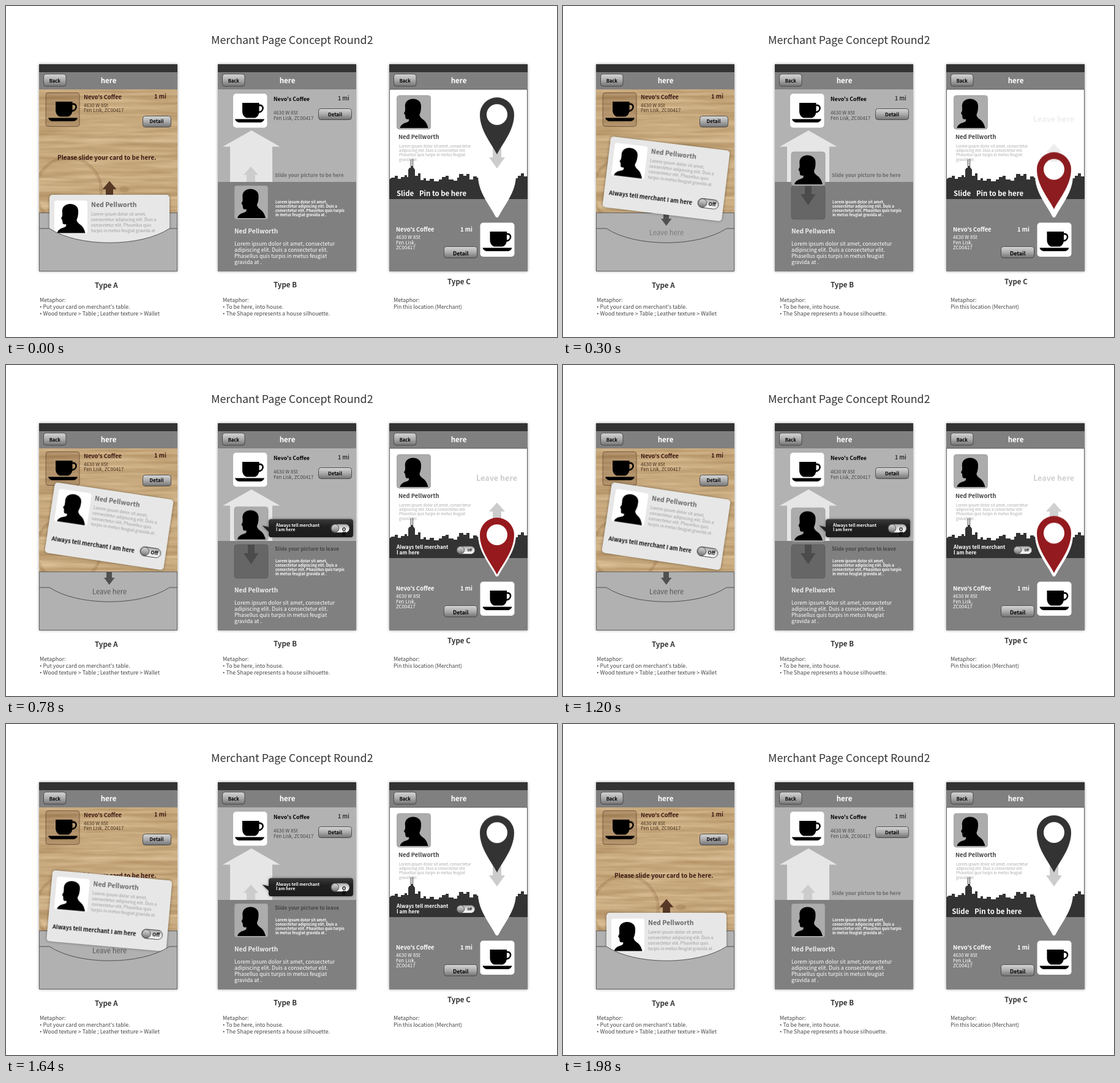
An HTML page for the animation above (2 s loop, 900 by 540 pixels).

```html
<!DOCTYPE html>
<html lang="en">
<head>
<meta charset="utf-8">
<title>Merchant Page Concept</title>
<style>
html, body { margin: 0; width: 100%; height: 100%; overflow: hidden; background: #fff; }
svg { display: block; width: 900px; height: 540px; }
text { font-family: "Noto Sans CJK JP", "Noto Sans CJK SC", "Noto Sans CJK KR", "Noto Sans CJK TC", "Noto Sans", sans-serif; }
.b { font-weight: 700; }
.mid { text-anchor: middle; }
.dot { font-family: "Open Sans", sans-serif; }
.shadow { filter: drop-shadow(0 0 2px rgba(0, 0, 0, .4)); }
.btn { fill: url(#metal); stroke: #444; stroke-width: .9; }

.card, .tile, .pin, .show, .hide, .slideOut, .slideIn, .leave, .down, .pocketHint {
  animation: 2s linear infinite;
  --out: cubic-bezier(.333, .667, .667, 1);
}
.card { animation-name: card; }
.tile { animation-name: tile; }
.pin { animation-name: pin; }
.show { animation-name: show; }
.hide { animation-name: hide; }
.slideOut { animation-name: slideOut; }
.slideIn { animation-name: slideIn; }
.leave { animation-name: leave; }
.down { animation-name: down; }
.pocketHint { animation-name: pocketHint; }

@keyframes card {
  0% { transform: translate(169px, 366px) rotate(0deg); animation-timing-function: var(--out); }
  29.3%, 76.2% { transform: translate(168.5px, 263px) rotate(8.5deg); animation-timing-function: var(--out); }
  99.7%, 100% { transform: translate(169px, 366px) rotate(0deg); }
}
@keyframes tile {
  0% { transform: translateY(0); animation-timing-function: var(--out); }
  24.5%, 59% { transform: translateY(-61.5px); animation-timing-function: var(--out); }
  83.5%, 100% { transform: translateY(0); }
}
@keyframes pin {
  0% { transform: translate(802px, 177px); fill: #333; animation-timing-function: var(--out); }
  24.5%, 59% { transform: translate(802px, 277px); fill: #96191d; animation-timing-function: var(--out); }
  83.5%, 100% { transform: translate(802px, 177px); fill: #333; }
}
@keyframes show {
  0%, 27% { opacity: 0; }
  39%, 86% { opacity: 1; }
  98.5%, 100% { opacity: 0; }
}
@keyframes hide {
  0%, 27% { opacity: 1; }
  39%, 86% { opacity: 0; }
  98.5%, 100% { opacity: 1; }
}
@keyframes slideOut {
  0%, 27% { transform: translateX(0); }
  39%, 86% { transform: translateX(-42px); }
  100% { transform: translateX(0); }
}
@keyframes slideIn {
  0%, 27% { transform: translateX(40px); }
  39%, 86% { transform: translateX(0); }
  100% { transform: translateX(40px); }
}
@keyframes leave {
  0%, 9% { opacity: 0; }
  27%, 59% { opacity: 1; animation-timing-function: var(--out); }
  70%, 100% { opacity: 0; }
}
@keyframes down {
  0% { opacity: 1; }
  8%, 66% { opacity: 0; }
  80%, 100% { opacity: 1; }
}
@keyframes pocketHint {
  0%, 8% { opacity: 0; }
  20%, 84% { opacity: 1; }
  90%, 100% { opacity: 0; }
}
</style>
</head>
<body>
<svg viewBox="0 0 900 540">
<defs>
  <linearGradient id="metal" x2="0" y2="1">
    <stop stop-color="#d6d6d6"/><stop offset=".5" stop-color="#ababab"/><stop offset="1" stop-color="#727272"/>
  </linearGradient>
  <linearGradient id="pill" x2="0" y2="1">
    <stop stop-color="#a8a8a8"/><stop offset=".5" stop-color="#dedede"/><stop offset="1" stop-color="#fff"/>
  </linearGradient>
  <linearGradient id="bubble" x2="0" y2="1">
    <stop stop-color="#3a3a3a"/><stop offset=".4" stop-color="#202020"/><stop offset="1" stop-color="#1c1c1c"/>
  </linearGradient>
  <filter id="wood" x="0" y="0" width="1" height="1" color-interpolation-filters="sRGB">
    <feTurbulence type="fractalNoise" baseFrequency=".009 .13" numOctaves="3" seed="8"/>
    <feColorMatrix values=".22 0 0 0 .67  .24 0 0 0 .54  .26 0 0 0 .36  0 0 0 0 1"/>
  </filter>
  <clipPath id="woodBox"><rect x="54" y="136" width="226" height="201"/></clipPath>
  <clipPath id="pocketBox"><path d="M40 130H300V363H267C220 394 118 394 71 363H40Z"/></clipPath>
  <clipPath id="screenC"><rect x="626" y="136" width="226" height="297"/></clipPath>

  <g id="frame">
    <rect class="shadow" width="226" height="338" fill="#808080"/>
    <rect width="226" height="13" fill="#333"/>
    <rect class="btn" x="7.5" y="16" width="36.500" height="20" rx="4"/>
    <text class="b" x="16.700" y="30" font-size="7.500">Back</text>
    <text class="b" x="100.700" y="30.800" font-size="11.600" fill="#fff">here</text>
  </g>
  <g id="cup">
    <path d="M16 14.500H43.500V28C43.500 34 40.500 37.500 37 39H22.500C19 37.500 16 34 16 28Z"/>
    <path d="M43 18.500C52 17 52 29 42 30" fill="none" stroke="#000" stroke-width="2.600"/>
    <path d="M4 41H52C51 44.500 48 46.500 44 46.500H12C8 46.500 5 44.500 4 41Z"/>
  </g>
  <path id="man" d="M5 53C6 48 11 45 17 43.500C20 42.500 20 40 19.500 38.500C16 39 14 38.500 14 36L13.500 32L11.500 29L13.500 25V20C12 11 18 6 25 5.500C35 5 40 11 39.500 18C39.500 24 38.500 28 37 31C37 35 40 37 43 39.500C47 42 50 48 51 53Z"/>
  <g id="greyMan">
    <rect width="55" height="55" rx="4" fill="#acacac" stroke="#999" stroke-width=".8"/>
    <use href="#man"/>
  </g>
  <g id="toggle">
    <rect x="-17" y="-7.500" width="34" height="15" rx="7.500" fill="url(#pill)" stroke="#444"/>
    <circle cx="-9.500" r="7" fill="url(#metal)" stroke="#444" stroke-width=".9"/>
  </g>
  <path id="pinShape" d="M0 65C-9 47 -28 26 -28 0A28 28 0 1 1 28 0C28 26 9 47 0 65Z"/>
</defs>

<rect width="900" height="540" fill="#fff"/>
<text x="335" y="62" font-size="17.850" fill="#333">Merchant Page Concept Round2</text>

<!-- Type A -->
<use href="#frame" x="54" y="95"/>
<rect x="54" y="136" width="226" height="201" filter="url(#wood)"/>
<g clip-path="url(#woodBox)" fill="none" stroke="#6b3f1c">
  <circle cx="102" cy="301" r="53" stroke-width="5" opacity=".14"/>
  <circle cx="102" cy="301" r="55" stroke-width="1" opacity=".22"/>
  <ellipse cx="193" cy="299" rx="8" ry="5" fill="#6b3f1c" stroke="none" opacity=".15"/>
</g>
<rect x="65" y="141.500" width="55" height="55" rx="4" fill="#6b4a2c" fill-opacity=".25" stroke="#5c4028" stroke-opacity=".7"/>
<use href="#cup" x="65" y="141.500"/>
<g fill="#3c1a15">
  <text class="b" x="127" y="152" font-size="9.300">Nevo's Coffee</text>
  <text class="b" x="242" y="151" font-size="9.500">1 mi</text>
  <g font-size="7.900" fill="#43301f">
    <text x="127" y="165.200">4630 W 8St</text>
    <text x="127" y="173.400">Fen Lisk, ZC00417</text>
  </g>
  <text class="b" x="84" y="250.500" font-size="10">Please slide your card to be here.</text>
  <path d="M169 285.500L180.500 299H175V310H163V299H157.500Z" fill="#47291a" opacity=".88"/>
</g>
<rect class="btn" x="223.500" y="179.500" width="46" height="18" rx="4"/>
<text class="b mid" x="246" y="191.200" font-size="8">Detail</text>
<rect x="54.500" y="337.500" width="225" height="95" fill="#b1b1b1" stroke="#555" stroke-width=".8"/>
<path d="M164 337.500H173V347H177.500L168.700 358.500L160 347H164Z" fill="#505050"/>
<text class="pocketHint" x="141" y="374.300" font-size="11.200" fill="#555">Leave here</text>
<g clip-path="url(#pocketBox)">
  <g class="card">
    <g transform="translate(-98 -58)">
      <rect class="shadow" width="196" height="116" rx="5" fill="#e7e7e7"/>
      <rect x="8" y="9.500" width="54" height="54" rx="4" fill="#fff"/>
      <use href="#man" x="7.500" y="9.500"/>
      <text class="b" x="68" y="20" font-size="10.600" fill="#666">Ned Pellworth</text>
      <g font-size="6.850" fill="#999">
        <text x="68" y="34">Lorem ipsum dolor sit amet,</text>
        <text x="68" y="43.200">consectetur adipiscing elit. Duis a</text>
        <text x="68" y="52.200">consectetur elit. Phasellus quis</text>
        <text x="68" y="61.200">turpis in metus feugiat gravida at .</text>
      </g>
      <text class="b" x="8" y="94.500" font-size="9.050" fill="#111">Always tell merchant I am here</text>
      <use href="#toggle" x="171" y="90"/>
      <text class="b" x="171.500" y="93.200" font-size="8">Off</text>
    </g>
  </g>
</g>
<path d="M54.500 363H71C118 394 220 394 267 363H279.500" fill="none" stroke="#444" stroke-width=".9"/>

<!-- Type B -->
<use href="#frame" x="346" y="95"/>
<rect x="346" y="136" width="226" height="151" fill="#b2b2b2"/>
<rect x="371" y="143" width="55.500" height="55.500" rx="5" fill="#fff"/>
<use href="#cup" x="370" y="143.500"/>
<text class="b" x="437" y="154.500" font-size="8.850">Nevo's Coffee</text>
<text class="b" x="542" y="153.500" font-size="9" fill="#333">1 mi</text>
<g font-size="7.900" fill="#444">
  <text x="437" y="177">4630 W 8St</text>
  <text x="437" y="185.500">Fen Lisk, ZC00417</text>
</g>
<rect class="btn" x="510.500" y="167.500" width="54" height="18" rx="4"/>
<text class="b mid" x="537.500" y="179.700" font-size="8">Detail</text>
<path d="M401 203L447.500 229.500H435V287H366V229.500H354Z" fill="#e6e6e6"/>
<path d="M400 262L412 275.500H407V287H393V275.500H388Z" fill="#ccc"/>
<rect x="373" y="293" width="55" height="55" rx="4" fill="#666" stroke="#5c5c5c" stroke-width=".8"/>
<path d="M395 293H406V307H412.500L400.500 325L388 307H395Z" fill="#4b4b4b"/>
<text class="b hide" x="439" y="279.300" font-size="8.140" fill="#6a6a6a">Slide your picture to be here</text>
<text class="b show" x="439" y="303.300" font-size="8.200" fill="#444">Slide your picture to leave</text>
<g fill="#fff">
  <g class="b" font-size="6.130">
    <text x="440" y="322">Lorem ipsum dolor sit amet,</text>
    <text x="440" y="329">consectetur adipiscing elit. Duis a</text>
    <text x="440" y="336">consectetur elit. Phasellus quis turpis</text>
    <text x="440" y="343">in metus feugiat gravida at .</text>
  </g>
  <text class="b" x="373" y="370.800" font-size="10.150" fill="#eee">Ned Pellworth</text>
  <g font-size="8.720">
    <text x="373" y="391">Lorem ipsum dolor sit amet, consectetur</text>
    <text x="373" y="401">adipiscing elit. Duis a consectetur elit.</text>
    <text x="373" y="411">Phasellus quis turpis in metus feugiat</text>
    <text x="373" y="421">gravida at .</text>
  </g>
</g>
<g class="tile"><use href="#greyMan" x="373" y="293"/></g>
<g class="show">
  <path class="shadow" d="M433 251.500H563Q567 251.500 567 255.500V277Q567 281 563 281H433Q429 281 429 277V272L418.500 262L429 264.500V255.500Q429 251.500 433 251.500Z" fill="url(#bubble)"/>
  <g class="b" font-size="6.900" fill="#fff">
    <text x="441" y="264">Always tell merchant</text>
    <text x="441" y="271.300">I am here</text>
  </g>
  <use href="#toggle" transform="translate(546 266.500) scale(.89 .93)"/>
  <g class="b" font-size="8">
    <text x="549" y="271">O</text>
    <text x="549" y="279">ff</text>
  </g>
</g>

<!-- Type C -->
<use href="#frame" x="626" y="95"/>
<rect x="626" y="136" width="225.500" height="179" fill="#fff"/>
<path d="M626.500 136V315M626 136H851.500V315" fill="none" stroke="#444" stroke-width=".8"/>
<path fill="#333" d="M626 315V283L630 280H635V277H640V282H645V279H651V276H655V279H657V267L659 264H661V250H662V261H664V249H665V263L668 267V277H673V273H677V284H682V281H686V285H692V282H699V286H707V283H712V279H718V277H723V283H731V285H737V280H740V274H747V277H752V274H757V283H763V278H769V280H774V276H830V281H836V277H841V273H846V278H852V315Z"/>
<use href="#greyMan" x="638.500" y="146"/>
<text class="b" x="641" y="216.700" font-size="9.460" fill="#444">Ned Pellworth</text>
<g font-size="6.240" fill="#a6a6a6">
  <text x="642" y="231">Lorem ipsum dolor sit amet, consectetur</text>
  <text x="642" y="238.200">adipiscing elit. Duis a consectetur elit.</text>
  <text x="642" y="245.400">Phasellus quis turpis in metus feugiat</text>
  <text x="642" y="252.600">gravida at .</text>
</g>
<g clip-path="url(#screenC)" fill="#fff">
  <g class="hide">
    <g class="b slideOut" font-size="11.400">
      <text x="638" y="309.800">Slide</text>
      <text x="675" y="309.800">Pin to be here</text>
    </g>
  </g>
  <g class="show">
    <g class="b slideIn" font-size="8.200">
      <text x="638" y="300">Always tell merchant</text>
      <text x="638" y="309.200">I am here</text>
      <use href="#toggle" transform="translate(751 302) scale(.88 .86)"/>
      <text x="753.500" y="304" font-size="5" fill="#000">Off</text>
    </g>
  </g>
</g>
<use href="#pinShape" x="802" y="277" fill="#fff" stroke="#fff" stroke-width="6" stroke-linejoin="round"/>
<g fill="#fff">
  <text class="b" x="637" y="368" font-size="9.400">Nevo's Coffee</text>
  <text class="b" x="742" y="367.500" font-size="9.500">1 mi</text>
  <g font-size="7.900">
    <text x="637" y="380">4630 W 8St</text>
    <text x="637" y="388.700">Fen Lisk,</text>
    <text x="637" y="397.200">ZC00417</text>
  </g>
</g>
<rect class="btn" x="715.500" y="392.500" width="54" height="18.500" rx="4"/>
<text class="b mid" x="742.800" y="406.500" font-size="8.800">Detail</text>
<rect x="774.500" y="353.500" width="56" height="55.500" rx="5" fill="#fff"/>
<use href="#cup" x="774.500" y="353.500"/>
<path class="down" d="M795 228H809V247H815L802 265L789 247H795Z" fill="#ccc"/>
<g class="leave" fill="#ccc">
  <text class="b" x="768" y="189" font-size="12.600">Leave here</text>
  <path d="M802 224.500L815 239H809V254H795V239H789Z"/>
</g>
<path class="pin" fill-rule="evenodd" d="M0 65C-9 47 -28 26 -28 0A28 28 0 1 1 28 0C28 26 9 47 0 65ZM17 0A17 17 0 1 0 -17 0A17 17 0 1 0 17 0Z"/>

<!-- Captions -->
<g class="b" font-size="11.500" fill="#333">
  <text x="145" y="460">Type A</text>
  <text x="437" y="459">Type B</text>
  <text x="721" y="454">Type C</text>
</g>
<g font-size="8.900" fill="#444">
  <text x="55" y="483">Metaphor:</text>
  <text class="dot" x="55" y="494.300">•</text>
  <text x="60.500" y="494.300">Put your card on merchant's table.</text>
  <text class="dot" x="55" y="505.300">•</text>
  <text x="60.500" y="505.300">Wood texture &gt; Table ; Leather texture &gt; Wallet</text>
  <text x="354" y="483">Metaphor:</text>
  <text class="dot" x="354" y="494.300">•</text>
  <text x="359.500" y="494.300">To be here, into house.</text>
  <text class="dot" x="354" y="505.300">•</text>
  <text x="359.500" y="505.300">The Shape represents a house silhouette.</text>
  <text x="633" y="483">Metaphor:</text>
  <text x="633" y="494.300" font-size="8.750">Pin this location (Merchant)</text>
</g>
</svg>
</body>
</html>
```
